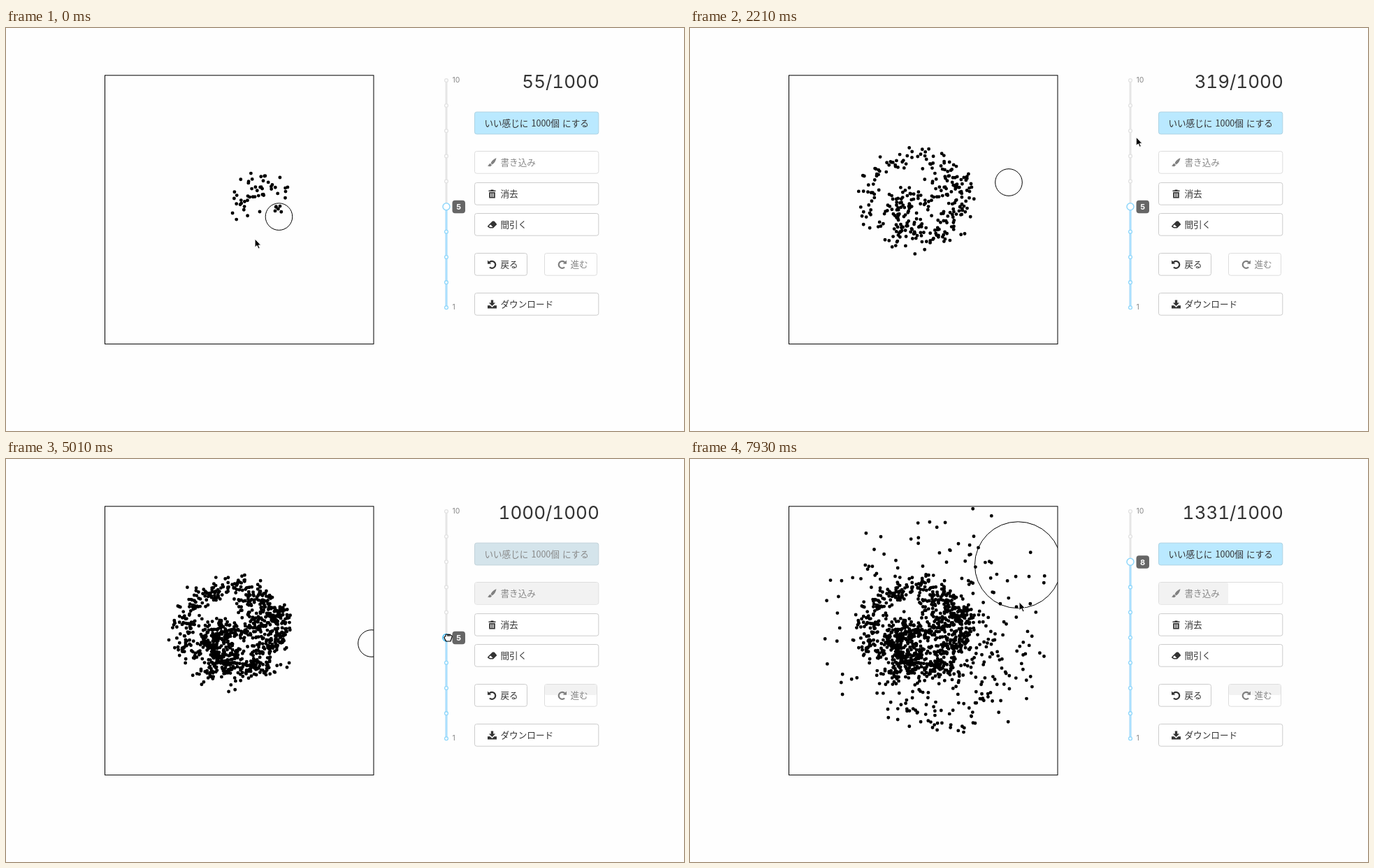
Animation of 970x577 px, one loop 7.99 s. Source, as an HTML page:

```html
<!DOCTYPE html>
<html lang="ja">
<head>
<meta charset="utf-8">
<title>Dot brush</title>
<style>
  html, body { margin: 0; width: 100%; height: 100%; overflow: hidden; background: #fefefe; }
  svg { display: block; width: 970px; height: 577px; }
  text { font: 12.6px "Noto Sans CJK JP", "Noto Sans CJK", "Noto Sans", sans-serif; fill: #333; }
  .off { color: #808080; }
  .off text { fill: #888; }
  #count { font: 26px Inter, sans-serif; font-variant-numeric: tabular-nums; text-anchor: end; }
  #fill text { text-anchor: middle; word-spacing: 1.2px; }
  .scale { font: 10.5px Inter, sans-serif; fill: #888; }
  #level { font: bold 11px Inter, sans-serif; fill: #fff; text-anchor: middle; }
</style>
</head>
<body>
<svg viewBox="0 0 970 577" color="#333">
  <clipPath id="area"><rect x="142" y="68" width="384" height="384"/></clipPath>
  <g clip-path="url(#area)">
    <path id="dots" stroke="#000" stroke-width="4.9" stroke-linecap="round"/>
    <circle id="brush" fill="none" stroke="#000"/>
  </g>
  <rect x="141.5" y="67.8" width="384.5" height="384.6" fill="none" stroke="#000"/>
  <text id="count" x="848.8" y="86.4"></text>
  <g id="buttons"></g>
  <path d="M630 75V400" stroke="#e6e6e6" stroke-width="3"/>
  <path id="bar" stroke="#abe0ff" stroke-width="3"/>
  <g id="ticks" fill="#fff"></g>
  <circle id="knob" cx="630" r="5" fill="#fff"/>
  <g id="tag">
    <rect x="638.5" y="-9" width="18.5" height="18.5" rx="4" fill="#666"/>
    <text id="level" x="647.7" y="4.3"></text>
  </g>
  <text class="scale" x="638.5" y="78">10</text>
  <text class="scale" x="638.5" y="403">1</text>
  <g id="mouse">
    <path id="arrow" d="M0 0V12L3 9.500L5 14L7 13L5 9H8.500Z" stroke="#fff" stroke-width=".9"/>
    <g id="ban" fill="#eee" stroke="#999" stroke-width="1.6"><circle cx="7" cy="15.5" r="6"/><path d="M3 11.500L11 19.500"/></g>
    <g id="hand" fill="#fff" stroke="#000" stroke-width="1.2" stroke-linejoin="round">
      <path id="open" d="M-2 8L-5 4Q-4 2-2 4L-2-1Q-1-3 0 0V-2Q1-4 2-2V0Q4-3 5 0V1Q7-1 7 2L5 9H-1Z"/>
      <path id="fist" d="M-2 8L-4 4Q-4 2-2 2V0Q-1-2 1 0Q2-2 3 0Q5-2 5 1Q8 0 7 3L5 9H-1ZM1 0V2M3 0V2"/>
    </g>
  </g>
</svg>
<script>
const LOOP = 7990, FILL = 2680, GRAB = 5010, DROP = 5760, SPREAD = 6400;
const { sin, cos, sqrt, min, round, PI } = Math;
const $ = id => document.getElementById(id);
const set = (id, attrs) => { for (const k in attrs) $(id).setAttribute(k, attrs[k]); };
const show = (id, on) => set(id, { display: on ? "inline" : "none" });

let seed = 4711;
const random = () => (seed = seed * 16807 % 2147483647) / 2147483647;

const icons = {
  brush: `<path d="M6-6.500Q0-4-2 1L0 3Q5 0 6-6.500ZM-2.600 1.600C-5 1.600-4.500 4.500-6.500 5Q-1 7-.6 3.600Z"/>`,
  trash: `<path d="M-5-5H-2V-6H2V-5H5V-3.500H-5ZM-4.300-2.600H4.300V6H-4.300Z"/><path d="M-2-1V4.500M0-1V4.500M2-1V4.500" stroke="#fff"/>`,
  eraser: `<path d="M-6.500 2L.5-5H3L6.500-1V0L1.500 5H-3.500L-6.500 3Z"/><path d="M-4.700 2.300L-2.200 0L1 3.500H-3Z" fill="#fff"/>`,
  undo: `<path d="M-4-3A5 5 0 1 1-3.600 4" fill="none" stroke="currentColor" stroke-width="2.200"/><path d="M-6.500-6V-.8H-1.300Z"/>`,
  save: `<path d="M-1.700-6H1.700V-2H4.600L0 2.400L-4.600-2H-1.700ZM-6.500 1.700H-3L0 4.500L3 1.700H6.500V6H-6.500Z"/>`
};
icons.redo = `<g transform="scale(-1 1)">${icons.undo}</g>`;

function button(id, x, y, w, label, icon, off) {
  const mark = icon ? `<g transform="translate(${x + 25.5} ${y + 16.5})" fill="currentColor">${icons[icon]}</g>` : "";
  return `<g id="${id}" class="${off ? "off" : ""}">
    <rect id="${id}Box" x="${x + .5}" y="${y + .5}" width="${w}" height="31.700" rx="3" fill="#fff" stroke="${off ? "#ddd" : "#ccc"}"/>
    <rect id="${id}Shade" x="${x + 1}" y="${y + 1}" width="0" height="30.700" rx="2" fill="#f2f2f2"/>
    ${mark}<text x="${icon ? x + 37.5 : x + w / 2 + .5}" y="${y + 20.8}">${label}</text></g>`;
}
$("buttons").innerHTML =
  button("fill", 670, 119.7, 177.3, "いい感じに 1000個 にする") +
  button("write", 670, 176, 177.3, "書き込み", "brush", true) +
  button("clear", 670, 221, 177.3, "消去", "trash") +
  button("thin", 670, 265, 177.3, "間引く", "eraser") +
  button("back", 670, 322, 75, "戻る", "undo") +
  button("next", 770, 322, 75, "進む", "redo", true) +
  button("load", 670, 379, 177.3, "ダウンロード", "save");

const levelY = v => 400.3 - 36.15 * (v - 1);
for (let v = 1; v <= 10; v++)
  $("ticks").innerHTML += `<circle id="tick${v}" cx="630" cy="${levelY(v)}" r="2.400" stroke-width="1.300"/>`;

// Keys are [time, a, b]; smooth through each key, at rest between equal ones.
function track(keys, t) {
  const next = keys.findIndex(k => k[0] > t);
  const i = (next < 0 ? keys.length - 1 : next) - 1;
  const a = keys[i], b = keys[i + 1], span = b[0] - a[0], u = min(1, (t - a[0]) / span);
  const slope = (j, c) => {
    const p = keys[j - 1], k = keys[j], n = keys[j + 1];
    return !p || !n || p[c] === k[c] || n[c] === k[c] ? 0 : (n[c] - p[c]) / (n[0] - p[0]);
  };
  return [1, 2].map(c => {
    const m = slope(i, c) * span, n = slope(i + 1, c) * span, d = b[c] - a[c];
    return a[c] + u * (m + u * (3 * d - 2 * m - n + u * (m + n - 2 * d)));
  });
}
const ellipse = (x, y, rx, ry, a) => [x + rx * cos(a), y + ry * sin(a)];

// Inward spiral of the small brush.
function spiral(t) {
  const u = t / 1800, r = 1 - .85 * u ** 3;
  return ellipse(326, 246, 70 * r, 62 * r, .4 + 9.6 * u ** .7);
}

// Outward spiral of the large brush: [time, angle, radius].
const turns = [
  [SPREAD, -.08, 87], [6700, 1.7, 75], [7030, 4.32, 44], [7120, 5.37, 84],
  [7480, 8, 78], [7650, 9.5, 122], [7930, 11.74, 154], [8020, 12.05, 122]
];
function sweep(t) {
  const [a, r] = track(turns, t);
  return ellipse(365, 265, r, r, a);
}

const penStops = [
  [1800, 317, 241], [2200, 456, 221], [3000, 456, 221], [3460, 402, 295],
  [4010, 410, 291], [4560, 523, 264], [5820, 523, 264], [6230, 452, 258]
];
const mouseStops = [
  [1800, 318, 241], [2350, 700, 140], [2690, 700, 140], [2880, 677, 187],
  [3460, 402, 295], [4010, 410, 291], [4650, 631, 252], [5070, 631, 252],
  [5650, 631, 143], [5800, 631, 143], [6230, 452, 258]
];
const pen = t => t < 1800 ? spiral(t) : t < SPREAD ? track(penStops, t) : sweep(t);

// The pointer runs ahead of the brush while drawing.
const mouse = t =>
  t < 1800 ? pen(t + 45) :
  t < 6300 ? track(mouseStops, t) :
  pen(t + min(90, (t - 6300) / 2));

const counts = [[0, 55], [1600, 290], [1800, 319], [FILL, 319], [FILL, 1000],
  [6440, 1000], [7030, 1127], [7930, 1331], [LOOP, 1344]];
function count(t) {
  const i = counts.findIndex(k => k[0] > t), [t0, n0] = counts[i - 1], [t1, n1] = counts[i];
  return round(n0 + (n1 - n0) * (t - t0) / (t1 - t0));
}

function level(t) {
  if (t < GRAB) return 5;
  if (t > 5650) return 8;
  return 1 + round((396 - mouse(t)[1]) / 36.15);
}
const radius = v => 19.3 * 1.475 ** (v - 5);

// Start with an arc of dots, follow the brush, and fill up near existing dots.
const dots = [];
function scatter([x, y], r) {
  dots.push(ellipse(x, y, r, r, random() * 2 * PI));
}
for (let t = 0; t < LOOP; t += 5) {
  while (dots.length < count(t)) {
    if (t === 0) scatter(ellipse(366, 252, 25, 30, PI * (.8 + 1.33 * random())), 19 * sqrt(random()));
    else if (t === FILL) scatter(dots[Math.floor(random() * count(t - 5))], 14 * random());
    else scatter(pen(t), radius(level(t)) * sqrt(random()));
  }
}
const marks = dots.map(([x, y]) => `M${x.toFixed(1)} ${y.toFixed(1)}h.01`);

function draw(t) {
  const n = count(t), v = level(t), y = levelY(v), [px, py] = pen(t), [mx, my] = mouse(t);
  set("dots", { d: marks.slice(0, n).join("") });
  set("brush", { cx: px, cy: py, r: radius(v) });
  $("count").textContent = n + "/1000";

  const full = n === 1000, over = t > 2300 && t < FILL;
  set("fill", { class: full ? "off" : "" });
  set("fillBox", { fill: full ? "#d4e4eb" : over ? "#a5dffc" : "#bae9ff", stroke: full ? "#c3d3da" : "#aed3e3" });
  set("writeShade", { width: full ? 176 : t >= 7270 ? 99 : 0 });
  set("nextShade", { width: t >= FILL ? 74 : 0, height: 15 });

  const held = t >= GRAB && t < DROP, open = t >= 4860 && t < GRAB, hover = open || held;
  set("bar", { d: `M630 ${y}V400` });
  for (let i = 1; i <= 10; i++) set("tick" + i, { stroke: i <= v ? "#8fd7fb" : "#e2e2e2" });
  set("knob", { cy: y, stroke: hover ? "#5cc6f8" : "#8fd7fb", "stroke-width": hover ? 2 : 1.5 });
  set("tag", { transform: `translate(0 ${y})` });
  $("level").textContent = v;

  set("mouse", { transform: `translate(${mx} ${my})` });
  show("arrow", !hover);
  show("ban", t > FILL && t < 4000 && mx > 670);
  show("open", open);
  show("fist", held);
}

let start;
function frame(now) {
  start ??= now;
  draw((now - start) % LOOP);
  requestAnimationFrame(frame);
}
draw(0);
requestAnimationFrame(frame);
</script>
</body>
</html>
```
